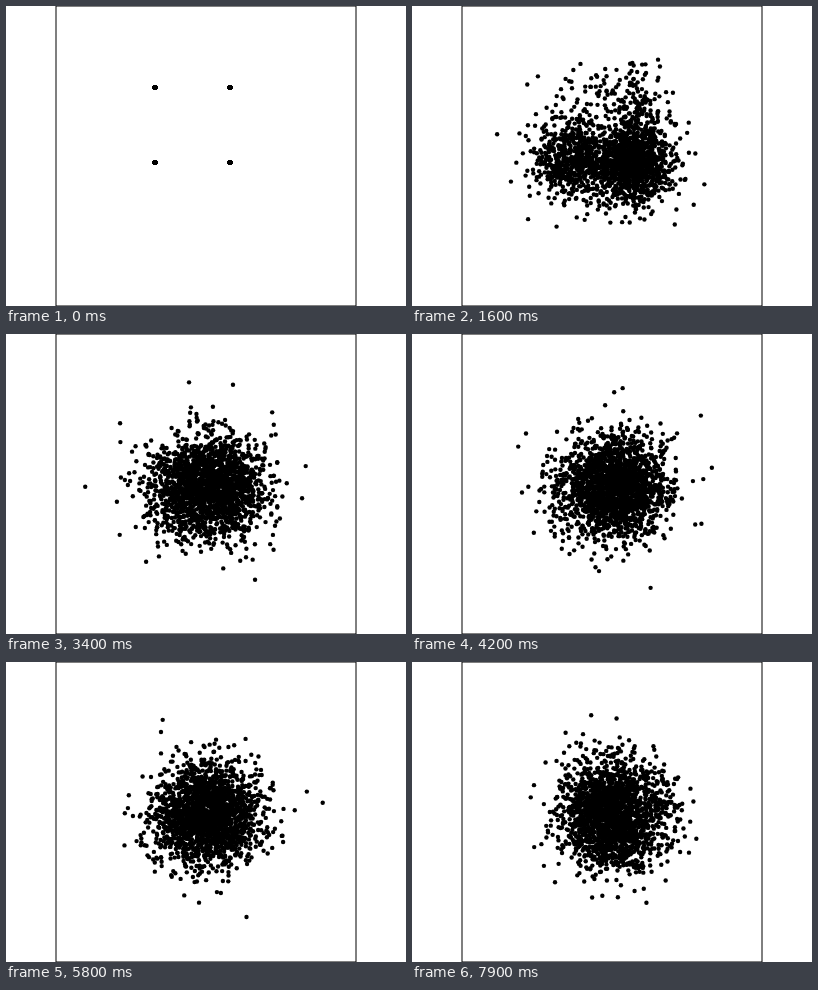
Write an HTML page with a canvas that moves like this. It is 400 px wide and 300 px high and loops after 8 s.

```html
<!DOCTYPE html>
<html lang="en">
<head>
<meta charset="utf-8">
<title>Diffusing walkers</title>
<style>
html, body { margin: 0; width: 100%; height: 100%; overflow: hidden; background: #fff; }
canvas { display: block; }
</style>
</head>
<body>
<canvas id="stage" width="400" height="300"></canvas>
<script>
const ctx = document.getElementById('stage').getContext('2d');
const STEPS = 80, STEP_MS = 100, COUNT = 2000;
const WIDTH = 26, DT = 0.043, CX = 200, CY = 152;

let seed = 20;
function random() {
  seed = (seed + 0x6D2B79F5) | 0;
  let t = Math.imul(seed ^ (seed >>> 15), 1 | seed);
  t = (t + Math.imul(t ^ (t >>> 7), 61 | t)) ^ t;
  return ((t ^ (t >>> 14)) >>> 0) / 4294967296;
}

function gauss() {
  return Math.sqrt(-2 * Math.log(1 - random())) * Math.cos(2 * Math.PI * random());
}

// Walkers diffuse, then die or multiply according to a harmonic potential.
function advance(walkers) {
  const jump = WIDTH * Math.sqrt(DT);
  const moved = walkers.map(([x, y]) => [x + jump * gauss(), y + jump * gauss()]);
  const weights = moved.map(([x, y]) =>
    Math.exp(-DT * ((x - CX) ** 2 + (y - CY) ** 2) / (2 * WIDTH * WIDTH)));
  const share = weights.reduce((a, b) => a + b) / COUNT;
  return moved.flatMap((walker, i) =>
    Array(Math.floor(weights[i] / share + random())).fill(walker));
}

const history = [Array.from({ length: COUNT }, (_, i) =>
  [149 + 75 * (i & 1), 81.5 + 75 * (i >> 1 & 1)])];
while (history.length < STEPS) history.push(advance(history[history.length - 1]));

function draw(walkers) {
  ctx.fillStyle = '#fff';
  ctx.fillRect(0, 0, 400, 300);
  ctx.strokeStyle = ctx.fillStyle = '#000';
  ctx.strokeRect(50, 0, 300, 300);
  for (const [x, y] of walkers) {
    ctx.beginPath();
    ctx.arc(x, y, 2.2, 0, 2 * Math.PI);
    ctx.fill();
  }
}

const start = performance.now();
let shown = -1;
function tick() {
  const step = Math.floor((performance.now() - start) / STEP_MS) % STEPS;
  if (step !== shown) draw(history[shown = step]);
  requestAnimationFrame(tick);
}
tick();
</script>
</body>
</html>
```
